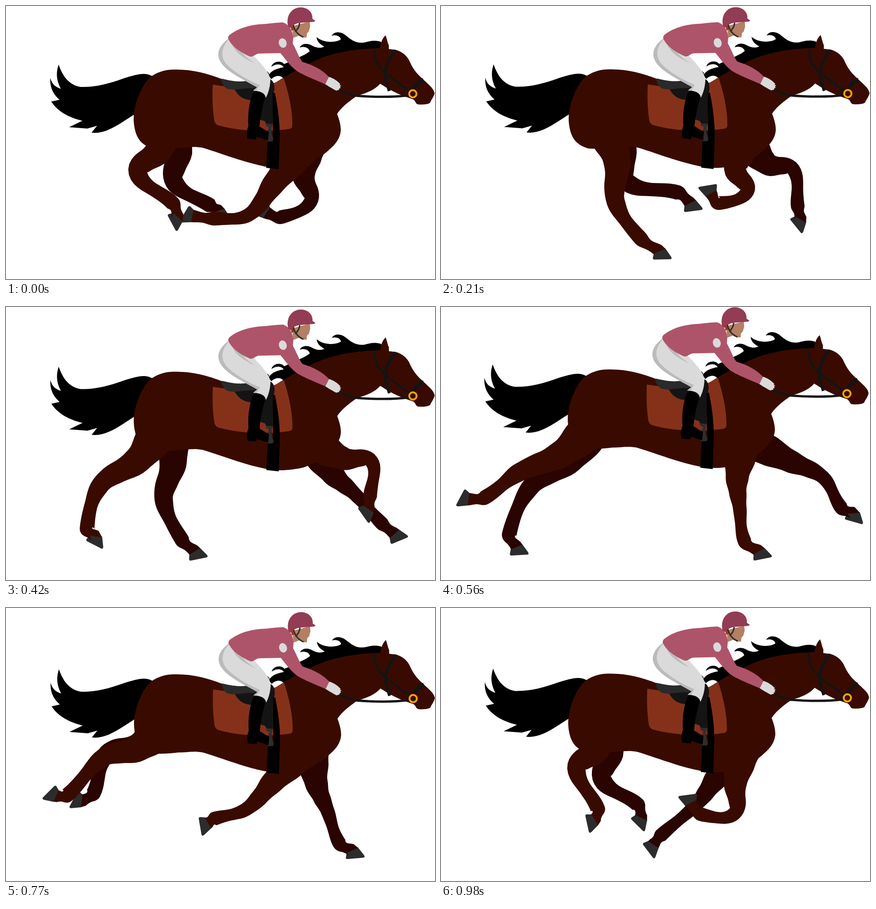
These frames come from a looping animation (938x597 px, 1050 ms). An HTML page:

```html
<!DOCTYPE html>
<html lang="en">
<head>
<meta charset="utf-8">
<title>Galloping horse</title>
<style>
html, body { margin: 0; width: 100%; height: 100%; overflow: hidden; background: #fff; }
svg { display: block; width: 100%; height: 100%; }
.near { fill: #390b00; }
.far { fill: #2a0400; }
.hoof { fill: #2c2c2c; }
.strap { fill: none; stroke: #141414; stroke-width: 5; }
</style>
</head>
<body>
<svg viewBox="0 0 938 597">
  <g id="farLegs"></g>
  <g class="ride">
    <path d="M319,153C302,144 285,150 258,158C225,170 195,178 163,177C138,173 124,154 115,128C109,146 110,163 120,181C106,177 99,168 97,157C95,178 104,194 117,205L99,209C113,231 138,244 167,251L138,265L178,268L199,262L187,277C220,281 250,256 284,235Z"/>
    <path d="M835,95L819,78C805,74 795,77 783,80C765,82 755,74 745,66C733,55 718,55 712,65C722,62 731,66 732,73C722,80 695,82 679,68C680,78 687,84 696,89C685,94 675,90 668,86C655,79 645,84 642,91C652,87 662,91 664,99C656,106 640,112 622,121L608,127C604,120 585,118 580,133C590,126 602,126 607,134C595,136 580,140 574,152L580,160C588,152 600,150 606,158L590,175L700,140Z"/>
    <path class="near" d="M319,153C335,143 350,139 367,139C405,138 440,147 475,161L500,180L588,168C602,160 650,128 700,110C740,97 780,93 820,92L853,96C868,101 876,109 881,118C892,143 902,151 917,165C931,178 935,182 937,191C935,200 929,206 927,212C920,216 908,216 900,215C895,213 896,208 890,204C865,196 850,190 818,170C805,184 790,190 768,196C748,210 733,222 724,236C730,252 732,262 732,272C731,288 722,301 708,313C690,330 670,342 648,349C610,357 585,355 566,351C520,342 470,322 430,310C410,306 395,310 375,310C350,313 335,313 322,312C300,305 290,295 284,278C277,255 278,235 284,214C292,188 303,165 319,153Z"/>
    <path class="near" d="M818,95C818,82 823,70 830,64C833,72 834,80 837,86L837,97Z"/>
  </g>
  <g id="nearLegs"></g>
  <g class="ride">
    <!-- tack -->
    <path fill="#85311a" d="M452,172L480,176L530,188L588,168L607,157C618,190 627,230 626,262Q626,268 618,269C570,276 510,274 464,261Q456,258 455,248C451,220 451,195 452,172Z"/>
    <path fill="#141414" d="M498,180L545,155L572,143L576,160C588,162 590,185 583,194L583,260L569,258L566,252L554,248L560,204L536,206C515,204 507,195 498,180Z"/>
    <path fill="#2a2a2a" d="M472,159C490,163 520,171 548,157L566,143L575,146L574,170L540,180C520,178 500,186 484,181C475,178 468,160 472,159Z"/>
    <path d="M583,190L588,190C595,225 600,260 598,300L596,357L569,354L572,296L584,290L583,230Z"/>
    <path fill="#2e2e2e" d="M568,257L584,258L581,264C579,278 582,285 585,290L583,296L571,296L574,264L569,263Z"/>
    <path class="strap" d="M722,179C735,189 748,193 763,196C800,199 845,200 884,195"/>
    <path class="strap" d="M805,95C805,122 816,137 840,155L883,187"/>
    <path class="strap" style="stroke-width:6.5" d="M852,97C832,118 823,150 833,170L838,186"/>
    <path class="strap" style="stroke-width:9" d="M891,181C895,172 902,166 913,162"/>
    <circle cx="889.500" cy="192" r="8" fill="none" stroke="#ffa500" stroke-width="4"/>
    <!-- rider -->
    <path d="M540,190Q548,181 564,187L568,196C560,220 557,240 554,263L568,272L575,275L573,294L548,286L547,292L528,290L526,275L530,262C528,235 532,210 540,190Z"/>
    <path fill="#dadada" d="M488,70L540,107C560,128 575,145 578,160C578,175 574,190 568,201Q566,186 540,185L550,177C520,162 490,145 475,130C455,108 465,86 488,70Z"/>
    <path fill="#bbb" d="M488,71C465,86 455,108 475,130C490,148 525,164 549,178L541,185L547,186L555,173C530,163 500,146 482,127C466,108 473,88 488,72ZM495,86C503,102 515,112 545,126C530,116 520,108 514,98Z"/>
    <path fill="#b47f63" d="M626,44L664,34L665,45L662,56L658,60L657,69L650,69L640,65L627,70Z"/>
    <path fill="#a03a1c" d="M622,42L630,39L630,52L624,54Z"/>
    <path fill="#ae546a" d="M488,64C510,46 540,40 570,39C585,37 597,36 606,36C618,41 626,50 628,70L627,82C637,100 640,112 648,122C674,130 693,141 706,155L698,171C670,159 645,149 633,140C618,127 610,115 600,103L552,104C543,106 540,113 532,110C515,102 497,92 487,74Q484,69 488,64Z"/>
    <path fill="#933c55" d="M617,45C611,22 624,3 645,3C663,4 671,16 670,28L676,32Q676,35 667,35L641,37Q629,39 622,48Z"/>
    <path fill="none" stroke="#2e2e2e" stroke-width="3" d="M642,37C641,47 637,52 632,56M628,42C632,56 640,64 650,68"/>
    <ellipse cx="605" cy="81" rx="8.500" ry="10.500" fill="#dadada" transform="rotate(-18 605 81)"/>
    <path fill="#dadada" d="M706,155C717,158 726,165 731,171L729,173L733,174L730,177L732,179L728,181L729,183L722,185C714,181 704,175 698,171Z"/>
  </g>
</svg>
<script>
const STEP = 70, COUNT = 15, HOOF = 27;
const TIMES = [0, 3, 5, 8, 10, 12, 14];
const track = (...rows) => rows.map(row => row.split(/[ ,]+/).map(Number));

// Key poses at TIMES: knee or hock, fetlock, back of the hoof, hoof tilt in degrees.
const foreA = track(
  '666,428 600,462 577,441 124', '770,357 780,438 775,460 31',
  '800,393 868,454 880,485 -36', '653,438 664,513 684,541 -31',
  '532,447 482,505 466,520 11', '545,434 463,422 445,402 110',
  '641,450 568,451 558,420 153');
const foreB = track(
  '530,457 455,465 410,446 101', '670,405 606,431 602,403 151',
  '767,335 741,408 717,428 62', '836,373 876,440 889,452 -4',
  '781,444 826,506 840,523 -19', '624,435 622,515 634,536 -22',
  '558,430 481,497 453,510 33');
const hindNear = track(
  '288,364 365,432 366,453 42', '382,428 437,509 466,541 -21',
  '243,404 240,515 265,541 -29', '170,362 95,417 62,407 98',
  '212,358 125,426 111,410 134', '219,302 160,398 137,395 88',
  '296,350 343,440 329,452 58');
const hindFar = track(
  '368,385 446,436 452,452 -19', '408,386 518,408 533,437 -27',
  '410,424 490,498 510,527 -25', '196,393 149,498 153,530 -23',
  '206,330 128,412 112,409 134', '248,322 276,412 250,427 40',
  '353,376 430,430 426,453 25');
const sway = track('0,0', '0,-0.5', '1,4.5', '-2,-2.5', '-3,4.5', '4,6.5', '-1,4.5');

// Anchor in the trunk, place of the upper joint, half widths at each joint and halfway between.
const fore = {
  anchor: [665, 290], along: 0.58, bend: reach => 0.4 * Math.max(0, 175 - reach),
  widths: [42, 34, 25, 19, 15, 12.5, 15, 11, 13.5]
};
const hind = {
  anchor: [350, 245], along: 0.52, bend: () => -18,
  widths: [48, 40, 30, 24, 20, 14.5, 16, 11, 13.5]
};

// Smooth cyclic interpolation through the key poses.
function sample(keys, tick) {
  const n = TIMES.length;
  let k = n - 1;
  while (TIMES[k] > tick) k--;
  const time = i => TIMES[(i + n) % n] + COUNT * Math.floor(i / n);
  const key = i => keys[(i + n) % n];
  const span = time(k + 1) - time(k), s = (tick - time(k)) / span;
  const slope = (i, j) => (key(i + 1)[j] - key(i - 1)[j]) / (time(i + 1) - time(i - 1)) * span;
  return key(k).map((a, j) => {
    const b = key(k + 1)[j], m = slope(k, j), w = slope(k + 1, j);
    return a + s * (m + s * (3 * (b - a) - 2 * m - w + s * (2 * (a - b) + m + w)));
  });
}

const sub = (a, b) => [a[0] - b[0], a[1] - b[1]];
const mix = (a, b, t) => a.map((v, i) => v + (b[i] - v) * t);
function unit(v) {
  const len = Math.hypot(...v) || 1;
  return [v[0] / len, v[1] / len];
}
const offset = (p, d, w) => [p[0] - d[1] * w, p[1] + d[0] * w];

// Point and direction on segment i of a smooth curve through the joints.
function bone(joints, i, t) {
  const last = joints.length - 1;
  const dir = k => unit(sub(joints[Math.min(k + 1, last)], joints[Math.max(k - 1, 0)]));
  const a = joints[i], d = joints[i + 1], h = Math.hypot(...sub(d, a)) / 3;
  const u = dir(i), v = dir(i + 1);
  const b = [a[0] + u[0] * h, a[1] + u[1] * h], c = [d[0] - v[0] * h, d[1] - v[1] * h];
  const bc = mix(b, c, t);
  const p = mix(mix(a, b, t), bc, t), q = mix(bc, mix(c, d, t), t);
  return { at: mix(p, q, t), dir: unit(sub(q, p)) };
}

function outline(joints, widths, back, front) {
  const left = [], right = [], cuts = 12;
  for (let k = 0; k < (joints.length - 1) * cuts; k++) {
    const { at, dir } = bone(joints, Math.floor(k / cuts), k % cuts / cuts);
    const half = k / cuts * 2, i = Math.floor(half), t = half - i;
    const w = widths[i] + (widths[i + 1] - widths[i]) * t * t * (3 - 2 * t);
    left.push(offset(at, dir, w));
    right.unshift(offset(at, dir, -w));
  }
  return 'M' + [...left, back, front, ...right]
    .map(p => p.map(v => v.toFixed(1)).join()).join('L') + 'Z';
}

function makeLeg(layer, tone, shape) {
  const add = (cls, d) => {
    const el = document.createElementNS('http://www.w3.org/2000/svg', 'path');
    el.setAttribute('class', cls);
    el.setAttribute('d', d);
    document.getElementById(layer).append(el);
    return el;
  };
  const hoof = add('hoof', 'M0,-1L27,-1L32,20Q33,26 28,24.5L-4,13Q-8,11.5 -6,8Z');
  const limb = add(tone, '');
  return ([kx, ky, fx, fy, hx, hy, tilt], shift) => {
    const root = [shape.anchor[0] + shift[0], shape.anchor[1] + shift[1]];
    const knee = [kx, ky], back = [hx, hy], rad = tilt * Math.PI / 180;
    const front = [hx + HOOF * Math.cos(rad), hy + HOOF * Math.sin(rad)];
    const line = sub(knee, root);
    const upper = offset(mix(root, knee, shape.along), unit(line), shape.bend(Math.hypot(...line)));
    const joints = [root, upper, knee, [fx, fy], mix(back, front, 0.5)];
    limb.setAttribute('d', outline(joints, shape.widths, back, front));
    hoof.setAttribute('transform', `translate(${hx} ${hy}) rotate(${tilt})`);
  };
}

const drawFarHind = makeLeg('farLegs', 'far', hind);
const drawFarFore = makeLeg('farLegs', 'far', fore);
const drawNearFore = makeLeg('nearLegs', 'near', fore);
const drawNearHind = makeLeg('nearLegs', 'near', hind);
const ride = document.querySelectorAll('.ride');

function draw(tick) {
  const shift = sample(sway, tick);
  // The forelegs trade sides halfway through the loop.
  const [near, far] = tick < COUNT / 2 ? [foreB, foreA] : [foreA, foreB];
  drawFarHind(sample(hindFar, tick), shift);
  drawFarFore(sample(far, tick), shift);
  drawNearFore(sample(near, tick), shift);
  drawNearHind(sample(hindNear, tick), shift);
  ride.forEach(g => g.setAttribute('transform', `translate(${shift.join(' ')})`));
}

const start = performance.now();
function loop() {
  draw(Math.floor((performance.now() - start) / STEP) % COUNT);
  requestAnimationFrame(loop);
}
loop();
</script>
</body>
</html>
```
